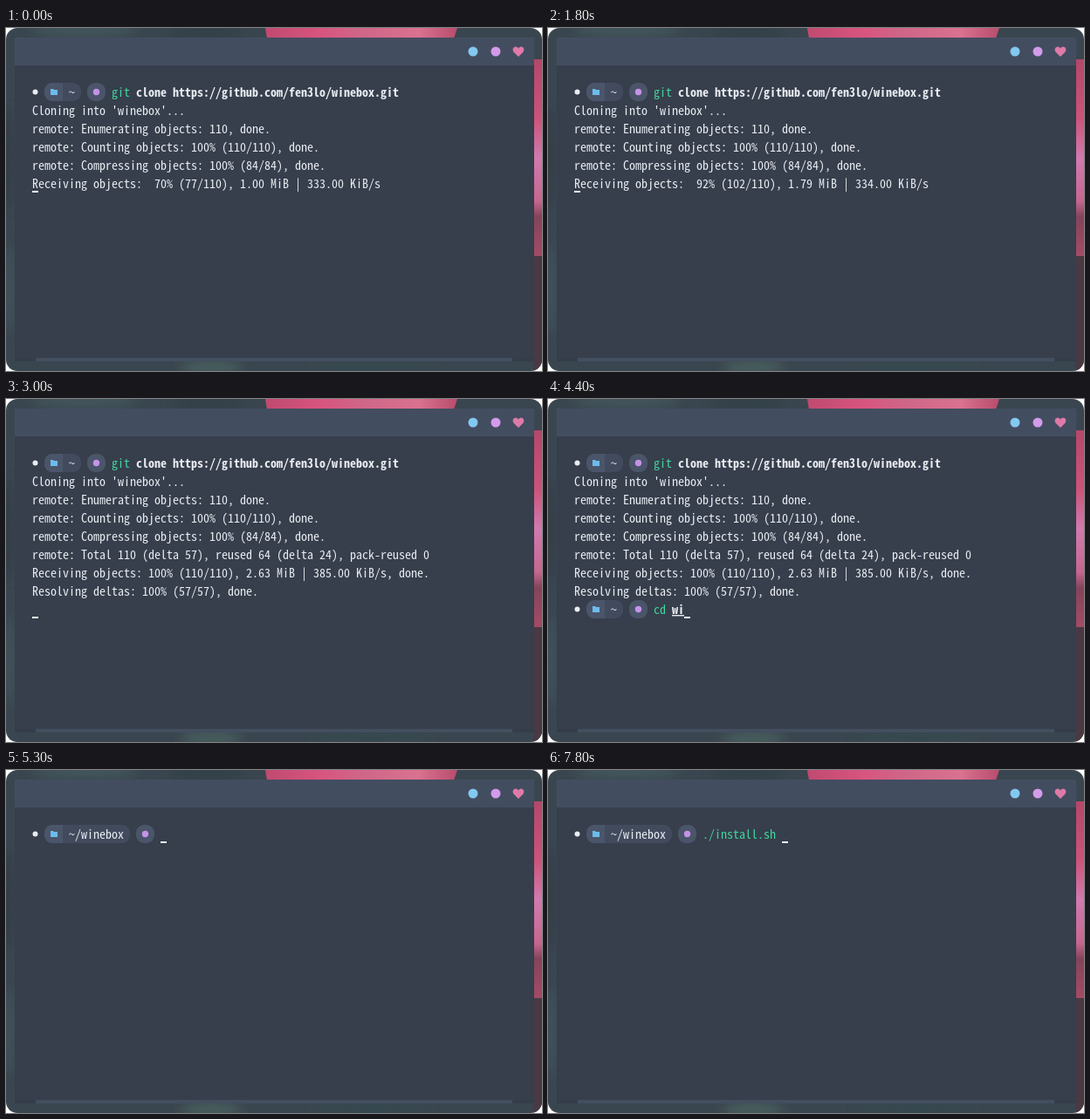
An HTML page for the animation above (8000 ms loop, 614 by 394 pixels).

```html
<!DOCTYPE html>
<html lang="en">
<head>
<meta charset="utf-8">
<title>Terminal</title>
<style>
  html, body { margin: 0; width: 100%; height: 100%; overflow: hidden; background: #fff; }
  svg { display: block; }
  text { white-space: pre; fill: #e8ecf1; }
  .bold { font-weight: 700; }
  .green { fill: #40d69c; }
  .blue { fill: #85cdec; }
  .red { fill: #e5739b; }
  .path { font-weight: 700; text-decoration: underline; }
</style>
</head>
<body>
<svg width="614" height="394" viewBox="0 0 614 394">
  <defs>
    <clipPath id="stage"><rect width="614" height="394" rx="13"/></clipPath>
    <filter id="soft" x="-50%" y="-50%" width="200%" height="200%"><feGaussianBlur stdDeviation="6"/></filter>
    <linearGradient id="topRose">
      <stop offset="0" stop-color="#c04a70"/>
      <stop offset=".3" stop-color="#d8557f"/>
      <stop offset=".5" stop-color="#cf6688"/>
      <stop offset=".8" stop-color="#d9718f"/>
      <stop offset="1" stop-color="#b84c6c"/>
    </linearGradient>
    <linearGradient id="sideRose" x2="0" y2="1">
      <stop offset="0" stop-color="#b5476a"/>
      <stop offset=".3" stop-color="#cc5379"/>
      <stop offset=".5" stop-color="#d07aae"/>
      <stop offset=".72" stop-color="#c7668f"/>
      <stop offset=".8" stop-color="#84445a"/>
      <stop offset="1" stop-color="#a54b65"/>
    </linearGradient>
  </defs>
  <g clip-path="url(#stage)">
    <rect width="614" height="394" fill="#3a464f"/>
    <g filter="url(#soft)">
      <ellipse cx="90" cy="2" rx="60" ry="8" fill="#43565c"/>
      <ellipse cx="230" cy="4" rx="45" ry="8" fill="#334047"/>
      <ellipse cx="2" cy="150" rx="8" ry="60" fill="#343e47"/>
      <ellipse cx="3" cy="300" rx="8" ry="50" fill="#40515a"/>
      <ellipse cx="235" cy="390" rx="35" ry="7" fill="#48615f"/>
      <ellipse cx="420" cy="390" rx="70" ry="7" fill="#364a50"/>
    </g>
    <path d="M297 0H517L513 12H299Z" fill="url(#topRose)"/>
    <path d="M604 36H614V262H604Z" fill="url(#sideRose)"/>
    <path d="M604 262H614V394H604Z" fill="#493943"/>
    <rect x="10" y="11" width="595" height="372" fill="#343d49"/>
    <rect x="34" y="379" width="546" height="4" fill="#434e5f"/>
    <rect x="10" y="11" width="595" height="368" fill="#373e4c"/>
    <rect x="10" y="11" width="595" height="32" fill="#434d60"/>
    <circle cx="535" cy="27" r="5.5" fill="#82c9f0"/>
    <circle cx="561" cy="27" r="5.5" fill="#d39be9"/>
    <path d="M587 33L581.5 27.5C578.5 23.5 584 19 587 23.5C590 19 595.500 23.5 592.5 27.5Z" fill="#df7aa8"/>
    <g id="screen"></g>
  </g>
</svg>
<script>
const LOOP = 8000, CELL = 7, LEFT = 30, ROW = 21, TOP = 63;
const family = '"Noto Sans Mono CJK JP", "Noto Sans Mono CJK SC", "Noto Sans Mono", "DejaVu Sans Mono", monospace';
const screen = document.getElementById('screen');

// Pick the font size whose advance equals one terminal cell.
const measure = document.createElement('canvas').getContext('2d');
measure.font = `100px ${family}`;
screen.style.fontFamily = family;
screen.style.fontSize = `${100 * CELL / measure.measureText('M').width}px`;

const span = (style, s) => `<tspan class="${style}">${s}</tspan>`;
const green = s => span('green', s);
const bold = s => span('bold', s);
const path = s => span('path', s);
const line = (row, s, x = LEFT) => `<text x="${x}" y="${TOP + 16 + row * ROW}">${s}</text>`;
const lines = (row, list) => list.map((s, i) => line(row + i, s)).join('');
const cursor = (row, x = LEFT) =>
  `<rect x="${x}" y="${TOP + 19 + row * ROW}" width="7" height="2" fill="#f4f6f8"/>`;
const plainLength = s => s.replace(/<[^>]*>/g, '').length;

function prompt(row, dir, input, showCursor = true) {
  const y = TOP + row * ROW, mid = y + 10.5;
  const end = 79 + dir.length * CELL, start = end + 35;
  return `<circle cx="33.5" cy="${mid}" r="3" fill="#e8ecf1"/>
    <rect x="44" y="${y}" width="${end - 44}" height="21" rx="9" fill="#424b5e"/>
    <path d="M65 ${y}H53a9 9 0 0 0 -9 9v3a9 9 0 0 0 9 9H65Z" fill="#4b556a"/>
    <path d="M51 ${mid - 3.5}h3l1 1h4v6h-8Z" fill="#6cbcec"/>
    <rect x="${end + 7}" y="${y}" width="21" height="21" rx="9" fill="#4b556a"/>
    <circle cx="${end + 17.5}" cy="${mid}" r="3.7" fill="#c692e9"/>`
    + line(row, dir, 72) + line(row, input, start)
    + (showCursor ? cursor(row, start + plainLength(input) * CELL) : '');
}

const cloning = prompt(0, '~', green('git') + bold(' clone https://github.com/fen3lo/winebox.git'), false)
  + lines(1, [
    "Cloning into 'winebox'...",
    'remote: Enumerating objects: 110, done.',
    'remote: Counting objects: 100% (110/110), done.',
    'remote: Compressing objects: 100% (84/84), done.'
  ]);
const cloned = cloning + lines(5, [
  'remote: Total 110 (delta 57), reused 64 (delta 24), pack-reused 0',
  'Receiving objects: 100% (110/110), 2.63 MiB | 385.00 KiB/s, done.',
  'Resolving deltas: 100% (57/57), done.'
]);
const receiving = (count, size, rate) => cloning + cursor(5) + line(5,
  `Receiving objects:  ${Math.floor(count / 1.1)}% (${count}/110), ${size} MiB | ${rate}.00 KiB/s`);
const changeDir = input => cloned + prompt(8, '~', input);
const inBox = (input, showCursor) => prompt(0, '~/winebox', input, showCursor);
const cd = green('cd');
const entered = cloned + prompt(8, '~', `${cd} ${path('winebox/')}`, false);
const listing = line(1, span('bold blue', 'assets') + '/      ' + span('bold green', 'install.sh') + '*');

const timeline = [
  [0, receiving(77, '1.00', 333)],
  [100, receiving(79, '1.00', 333)],
  [600, receiving(83, '1.21', 333)],
  [1100, receiving(87, '1.43', 334)],
  [1600, receiving(92, '1.63', 334)],
  [1700, receiving(97, '1.63', 334)],
  [1800, receiving(102, '1.79', 334)],
  [2100, receiving(105, '1.98', 344)],
  [2200, receiving(107, '1.98', 344)],
  [2600, receiving(109, '2.30', 369)],
  [3000, cloned + cursor(8)],
  [3100, changeDir('')],
  [3600, changeDir(span('bold red', 'c'))],
  [3800, changeDir(cd)],
  [3900, changeDir(cd + ' ')],
  [4200, changeDir(`${cd} ${path('w')}`)],
  [4400, changeDir(`${cd} ${path('wi')}`)],
  [4500, changeDir(`${cd} ${path('win')}`)],
  [4600, changeDir(`${cd} ${path('wine')}`)],
  [4700, changeDir(`${cd} ${path('winebox/')}`)],
  [4900, entered + cursor(9)],
  [5000, entered + prompt(9, '~/winebox', '')],
  [5300, inBox('')],
  [5800, inBox('', false)],
  [6300, inBox('')],
  [6500, inBox(bold('./'))],
  [7100, inBox(bold('./')) + listing],
  [7600, inBox(path('./i'))],
  [7800, inBox(green('./install.sh') + ' ')]
];

const origin = performance.now();
let shown;
function draw() {
  const time = (performance.now() - origin) % LOOP;
  const content = timeline.findLast(([start]) => start <= time)[1];
  if (content !== shown) screen.innerHTML = shown = content;
  requestAnimationFrame(draw);
}
draw();
</script>
</body>
</html>
```
